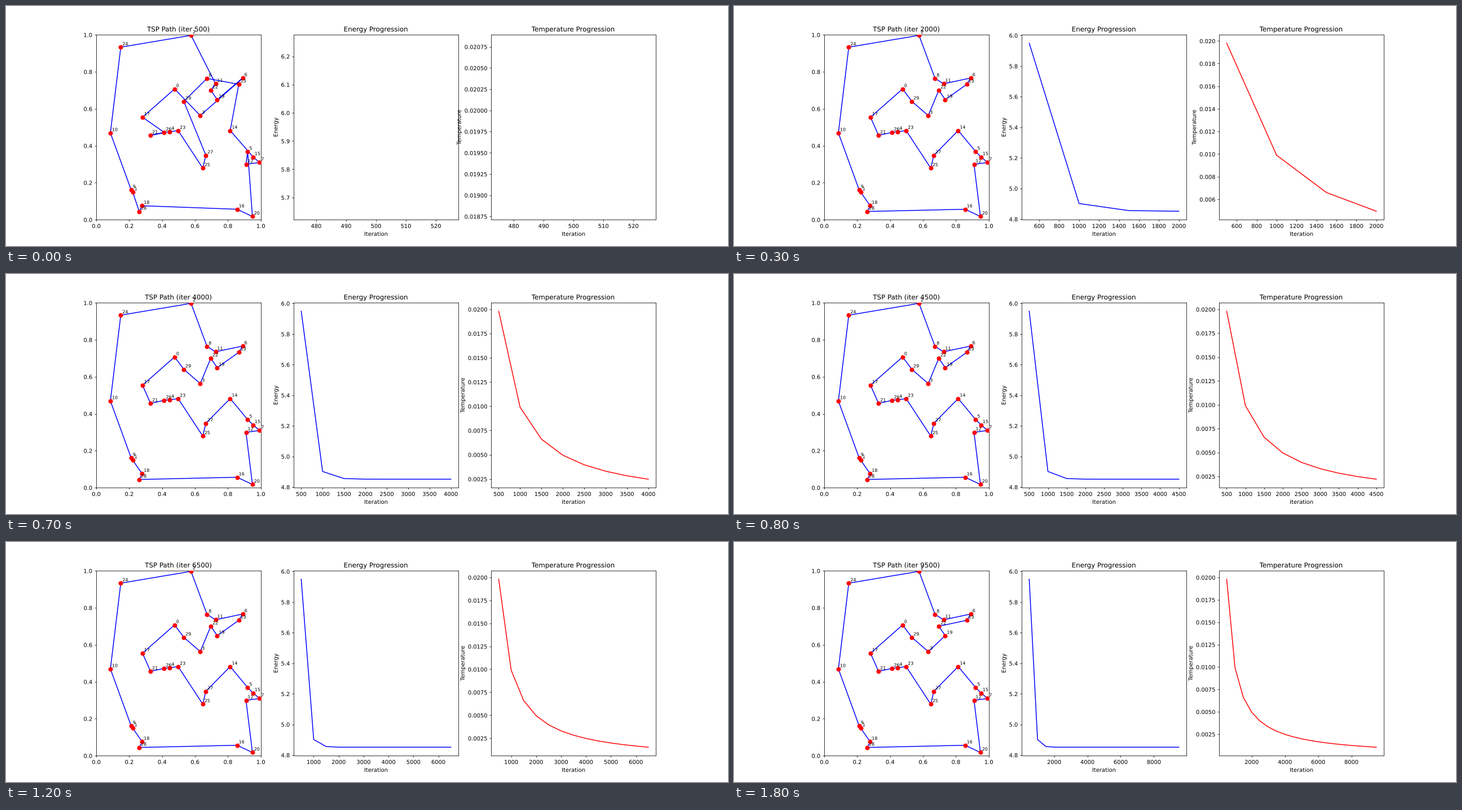
Write a matplotlib script that moves like this. It is 1280x427 px and loops after 1.9 s.

```python
import numpy as np
import matplotlib.pyplot as plt
from matplotlib.animation import FuncAnimation
from matplotlib.patheffects import Normal

plt.rcParams["font.family"] = "DejaVu Sans"
plt.rcParams["path.effects"] = [Normal()]  # text as smooth, unhinted outlines

FRAMES = 19
STEP = 500

# Cities in the order in which the settled tour visits them.
CITIES = {
    24: (0.149, 0.933), 2: (0.576, 0.997), 8: (0.673, 0.764),
    11: (0.725, 0.735), 6: (0.890, 0.766), 13: (0.866, 0.732),
    19: (0.735, 0.649), 22: (0.696, 0.700), 3: (0.632, 0.563),
    29: (0.532, 0.640), 0: (0.476, 0.707), 17: (0.281, 0.554),
    21: (0.330, 0.456), 26: (0.413, 0.472), 4: (0.447, 0.476),
    23: (0.498, 0.481), 25: (0.647, 0.279), 27: (0.666, 0.348),
    14: (0.814, 0.482), 5: (0.920, 0.368), 15: (0.953, 0.339),
    7: (0.992, 0.309), 12: (0.910, 0.299), 20: (0.949, 0.017),
    16: (0.856, 0.056), 28: (0.261, 0.044), 18: (0.279, 0.075),
    1: (0.222, 0.148), 9: (0.212, 0.161), 10: (0.086, 0.469),
}

# Detours (city, visited after) that annealing removes, the last ones first.
DETOURS = [(19, 11), (22, 11), (13, 27), (8, 27), (29, 27),
           (21, 26), (5, 12), (18, 16)]
LATE_MOVE = (22, 13)
LATE_START = 14

steps = np.arange(FRAMES)
iterations = STEP * (steps + 1)
energy = 4.851 + 1.098 * np.exp(-3.08 * steps ** 0.85)
temperature = 10 / (1.01 * iterations)


def moves_at(k):
    if k >= LATE_START:
        return [LATE_MOVE]
    return DETOURS[:{0: len(DETOURS), 1: 2}.get(k, 0)]


def tour_at(k):
    tour = list(CITIES)
    for city, after in moves_at(k):
        tour.remove(city)
        tour.insert(tour.index(after) + 1, city)
    return tour


def draw_tour(ax, k):
    ax.clear()
    tour = tour_at(k)
    x, y = zip(*(CITIES[c] for c in tour + tour[:1]))
    ax.plot(x, y, color="blue")
    ax.scatter(x[:-1], y[:-1], s=50, color="red", zorder=2.8)
    for city, (cx, cy) in CITIES.items():
        ax.text(cx + 0.01, cy + 0.01, str(city), fontsize=8)
    ax.set(xlim=(0, 1), ylim=(0, 1), title=f"TSP Path (iter {iterations[k]})")


def draw_curve(ax, k, values, name, color):
    ax.clear()
    ax.plot(iterations[:k + 1], values[:k + 1], color=color)
    ax.set(title=f"{name} Progression", xlabel="Iteration", ylabel=name)


def update(k):
    draw_tour(tour_ax, k)
    draw_curve(energy_ax, k, energy, "Energy", "blue")
    draw_curve(temp_ax, k, temperature, "Temperature", "red")
    return []


# 1280 x 427 pixels
fig, (tour_ax, energy_ax, temp_ax) = plt.subplots(
    1, 3, figsize=(18, 6.0046876), dpi=1280 / 18)

anim = FuncAnimation(fig, update, frames=FRAMES, init_func=lambda: [],
                     interval=100, repeat=True, repeat_delay=0)
plt.show()
```
